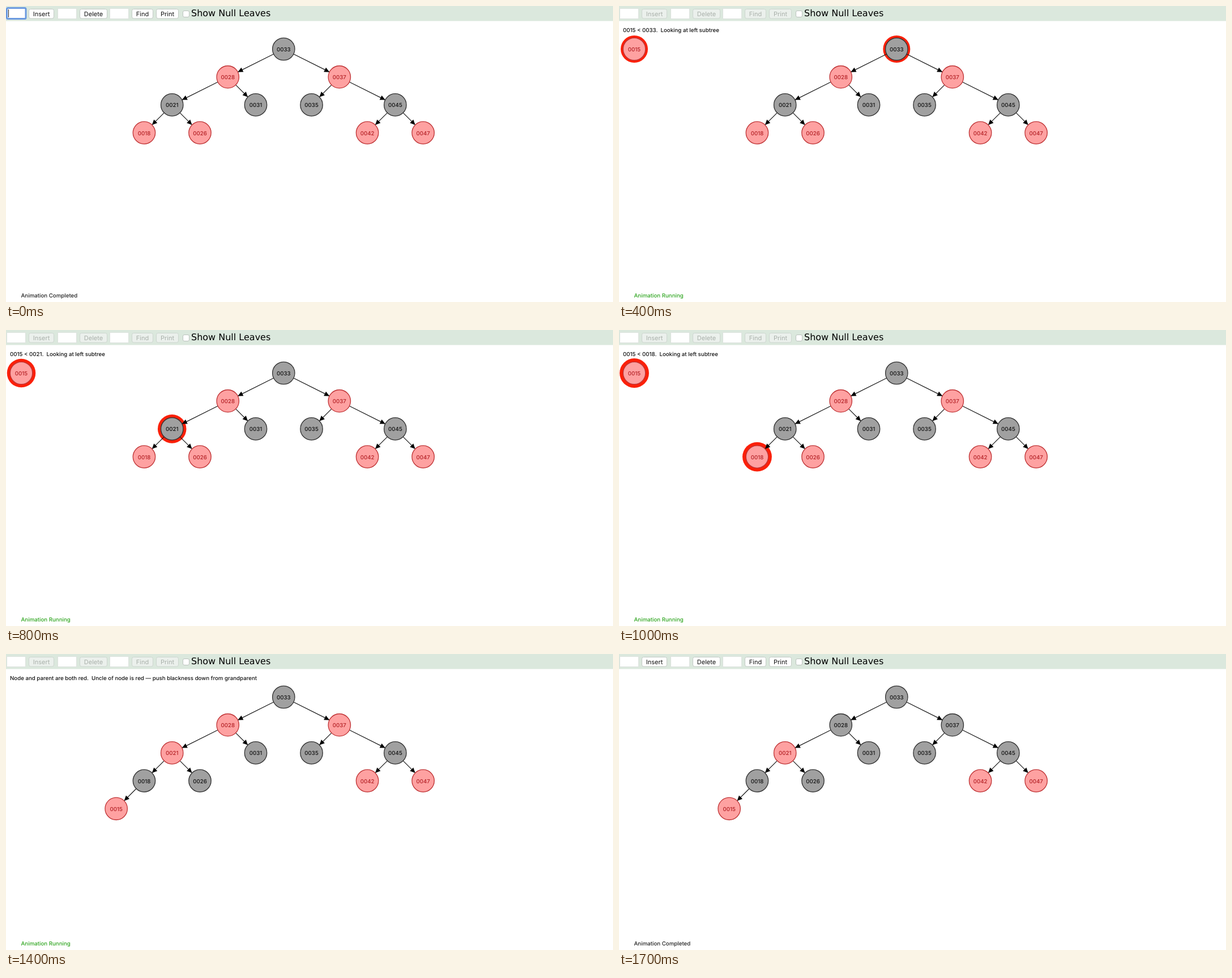
Write an HTML page that moves like this. It is 1072x522 px and loops after 2000 ms.

```html
<!DOCTYPE html>
<html lang="en">
<head>
<meta charset="utf-8">
<title>Red-black tree insertion</title>
<style>
  html, body { margin: 0; width: 100%; height: 100%; overflow: hidden; background: #fff; }
  svg { display: block; width: 100%; height: 100%; }
  text { white-space: pre; text-rendering: geometricPrecision; }
  .ui { font: 11px Inter, "Liberation Sans", sans-serif; }
  .label { font: 16px "DejaVu Sans", sans-serif; }
  .note { font: 500 9.7px Inter, "Liberation Sans", sans-serif; }
</style>
</head>
<body>
<svg id="stage" viewBox="0 0 1072 522"></svg>
<script>
const LOOP = 2000, STEP = 100, UNIT = 49.27, R = 19.7;
const RED = { fill: '#fea1a1', line: '#bf3234', ink: '#b21f24' };
const BLACK = { fill: '#a0a0a0', line: '#303030', ink: '#111' };
const CORNER = { x: 27, y: 76 };

// value: [column, level, parent]
const TREE = {
  33: [0, 0], 28: [-2, 1, 33], 37: [2, 1, 33],
  21: [-4, 2, 28], 31: [-1, 2, 28], 35: [1, 2, 37], 45: [4, 2, 37],
  18: [-5, 3, 21], 26: [-3, 3, 21], 42: [3, 3, 45], 47: [5, 3, 45],
  15: [-6, 4, 18]
};
const PATH = [33, 28, 21, 18];
const PUSH = 'Node and parent are both red.  Uncle of node is red –– push blackness down from grandparent';

const stage = document.getElementById('stage');
const place = v => ({ x: 490.3 + UNIT * TREE[v][0], y: 76 + 49.2 * TREE[v][1] });
const mix = (a, b, k) => ({ x: a.x + (b.x - a.x) * k, y: a.y + (b.y - a.y) * k });
const text = (x, y, str, cls, color, anchor = 'start') =>
  `<text x="${x}" y="${y}" class="${cls}" fill="${color}" text-anchor="${anchor}">${str.replace(/</g, '&lt;')}</text>`;
const rect = (x, y, w, h, fill, line, r = 0, sw = 1) =>
  `<rect x="${x}" y="${y}" width="${w}" height="${h}" rx="${r}" fill="${fill}" stroke="${line}" stroke-width="${sw}"/>`;
const circle = (p, r, fill, line = 'none', sw = 0) =>
  `<circle cx="${p.x}" cy="${p.y}" r="${r}" fill="${fill}" stroke="${line}" stroke-width="${sw}"/>`;

function node(v, p, c) {
  return circle(p, R, c.fill, c.line, 1.3) + text(p.x, p.y + 4, '00' + v, 'note', c.ink, 'middle');
}

function arrow(a, b) {
  const d = Math.hypot(b.x - a.x, b.y - a.y), ux = (b.x - a.x) / d, uy = (b.y - a.y) / d;
  const at = (s, w = 0) => `${a.x + ux * s - uy * w} ${a.y + uy * s + ux * w}`;
  const tip = d - R;
  return `<path d="M${at(R)}L${at(tip)}" stroke="#1c1c1c" stroke-width="1.25"/>` +
    `<path d="M${at(tip)}L${at(tip - 9, 4.3)}L${at(tip - 9, -4.3)}Z" fill="#000"/>`;
}

function toolbar(busy, focused, typed) {
  const ink = busy ? '#a9b0aa' : '#111';
  let out = '<rect width="1072" height="26.5" fill="#dbe8dd"/>';
  for (const x of [1.5, 91.5, 183.5]) out += rect(x, 4.5, 33, 18, '#fff', '#dde2de');
  for (const [x, w, name] of [[40.5, 44, 'Insert'], [130.5, 48, 'Delete'], [222.5, 37, 'Find'], [265.5, 39, 'Print']]) {
    out += rect(x, 5.5, w, 16.5, busy ? '#ebf0ec' : '#fff', busy ? '#cdd6cf' : '#c3cac5', 3);
    out += text(x + w / 2, 18, name, 'ui', ink, 'middle');
  }
  out += rect(312.5, 8.5, 11, 11, '#fff', '#bcc3be', 2.5) + text(327, 18, 'Show Null Leaves', 'label', '#000');
  if (focused) {
    out += rect(1.5, 3.5, 33.5, 19, '#fff', '#6b9ae0', 2, 3);
    out += text(4, 17.5, typed, 'ui', '#111');
    const caret = 4.5 + typed.length * 6;
    out += `<path d="M${caret} 6V20" stroke="#222"/>`;
  }
  return out;
}

function message(tick) {
  if (tick < 3 || tick > 16) return '';
  if (tick === 3) return 'Inserting 0015';
  if (tick < 11) return `0015 < 00${PATH[(tick - 4) >> 1]}.  Looking at left subtree`;
  if (tick === 11) return 'Found null tree (or phantom leaf), inserting element';
  return tick < 16 ? PUSH : 'Root of the tree is red.  Color it black';
}

function isRed(v, tick) {
  if (v === 18 || v === 26) return tick < 13;
  if (v === 21) return tick >= 13;
  if (v === 28 || v === 37) return tick < 15;
  if (v === 33) return tick === 15 || tick === 16;
  return v === 42 || v === 47 || v === 15;
}

function scene(tick) {
  const busy = tick >= 3 && tick < 17;
  const spot = v => v !== 15 || tick >= 12 ? place(v)
    : tick === 11 ? mix(CORNER, place(v), 0.5) : CORNER;
  const walk = tick >= 4 && tick <= 10;
  const index = (tick - 4) >> 1;
  let rings = '', edges = '', nodes = '', mover = '';

  if (walk && tick % 2 === 0) {
    const r = 24 + (tick - 4) * 0.32;
    rings = circle(CORNER, r, '#fb2009') + circle(place(PATH[index]), r, '#fb2009');
  } else if (walk) {
    mover = circle(mix(place(PATH[index]), place(PATH[index + 1]), 0.5), R, 'none', '#007700', 4);
  }
  for (const v of Object.keys(TREE).map(Number)) {
    if (v === 15 && tick < 3) continue;
    const up = TREE[v][2];
    if (up && (v !== 15 || tick >= 11)) edges += arrow(place(up), spot(v));
    nodes += node(v, spot(v), isRed(v, tick) ? RED : BLACK);
  }
  return toolbar(busy, tick < 3, ['', '1', '15'][tick]) +
    text(7, 45.5, message(tick), 'note', '#111') +
    rings + edges + nodes + mover +
    text(26.5, 513.5, busy ? 'Animation Running' : 'Animation Completed', 'note', busy ? '#2ea51f' : '#222');
}

let shown = -1;
const start = performance.now();
function frame() {
  const tick = Math.min(17, Math.floor((performance.now() - start) % LOOP / STEP));
  if (tick !== shown) stage.innerHTML = scene(shown = tick);
  requestAnimationFrame(frame);
}
frame();
</script>
</body>
</html>
```
